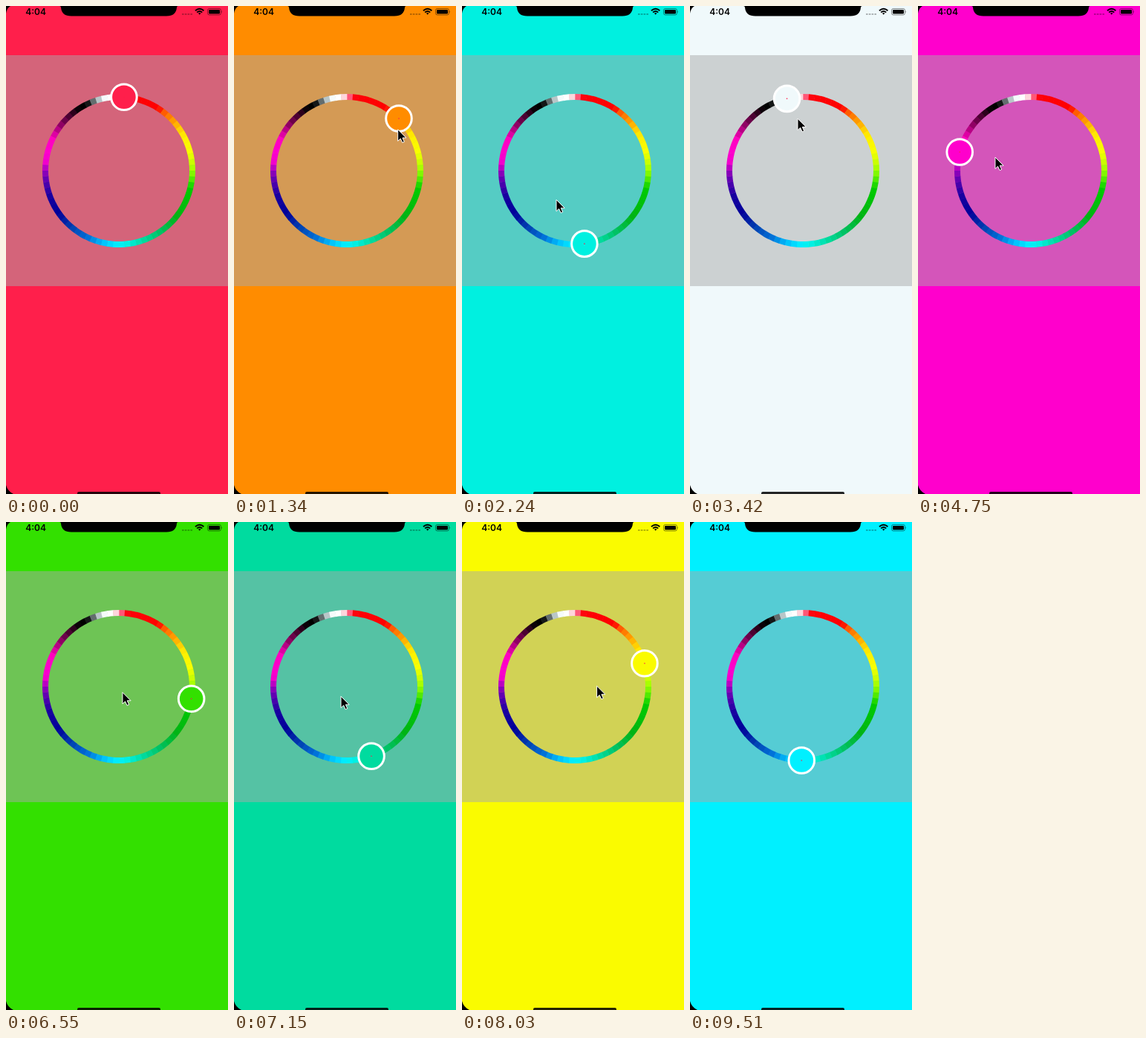
These frames come from a looping animation (299 px wide and 655 px high, 9940 ms). An HTML page:

```html
<!DOCTYPE html>
<html lang="en">
<head>
<meta charset="utf-8">
<title>Colour wheel</title>
<style>
  html, body { margin: 0; width: 100%; height: 100%; overflow: hidden; }
  svg { display: block; width: 299px; height: 655px; }
  text { font: 600 12px Inter, Roboto, sans-serif; }
</style>
</head>
<body>
<svg id="stage" viewBox="0 0 299 655">
  <rect id="back" width="299" height="655"/>
  <rect y="66" width="299" height="310" fill="#aaa" fill-opacity=".5"/>
  <g id="ring" fill="none" stroke-width="8"></g>
  <g id="knob">
    <circle id="disc" r="17.3" stroke="#fff" stroke-width="3"/>
    <circle r=".8" fill="#ff1f4b"/>
  </g>

  <!-- screen corners, notch and home bar -->
  <path d="M0 0H6Q1 3 0 10ZM0 643Q2 651 10 655H0Z"/>
  <path d="M72 0H232Q230 0 230 2Q229 13.5 216 13.5H88Q75 13.5 74 2Q74 0 72 0Z"/>
  <rect x="96" y="652" width="112" height="6" rx="2" fill-opacity=".85"/>

  <!-- status bar -->
  <text x="26.3" y="12.3">4:04</text>
  <path d="M237 11H251" stroke="#000" stroke-opacity=".28" stroke-width="2.2" stroke-dasharray="2.6 1.2"/>
  <g fill="none" stroke="#000" stroke-width="1.9">
    <path d="M255 6.2Q260.7 1.4 266.4 6.2M257.2 8.6Q260.7 5.6 264.2 8.6"/>
    <path d="M259 9.7Q260.7 8.5 262.4 9.7L260.7 11.8Z" fill="#000" stroke="none"/>
  </g>
  <rect x="271.5" y="3.5" width="18" height="8.5" rx="2.4" fill="none" stroke="#000" stroke-opacity=".45"/>
  <rect x="273" y="5" width="15" height="5.5" rx="1.2"/>
  <path d="M290.5 6.2Q292.2 7.7 290.5 9.3Z" fill-opacity=".5"/>

  <path id="cursor" d="M0 0V15.5L3.6 12.2L6.1 17.6L8.7 16.5L6.3 11.2H11.2Z" stroke="#fff"/>
</svg>
<script>
const el = id => document.getElementById(id);
const LOOP = 9940, STEP = 148.7;

// Wheel colours by degrees clockwise from the top
const stops = [
  [0, 'ffa0b0'], [4, 'ff1f4b'], [7, 'ff0008'], [32, 'ff0000'], [38, 'ff5a00'],
  [45, 'ff8c00'], [50, 'ffa800'], [55, 'ffc905'], [62, 'ffee00'], [75, 'f8ff00'],
  [83, 'ccff00'], [90, '99ff00'], [98, '44e600'], [104, '00cc00'], [128, '00b414'],
  [145, '00c060'], [160.5, '00db9f'], [172.5, '00f0e0'], [181, '00f0ff'], [190, '00ccff'],
  [197, '00a4f0'], [205, '0070d8'], [220, '0040b0'], [235, '000099'], [250, '1800a0'],
  [262, '5800b0'], [270, '9a00bd'], [276, 'f000cc'], [284.6, 'ff00cc'], [295, 'ff00c0'],
  [302, 'c80090'], [310, '800058'], [320, '380024'], [328, '000000'], [334, '000000'],
  [338, '404848'], [343, 'a4b2b4'], [347.5, 'f0f9fb'], [351, 'ffffff'], [356, 'ffffff'],
  [360, 'ffa0b0']
].map(([deg, hex]) => [deg, hex.match(/../g).map(h => parseInt(h, 16))]);

function wheelColor(angle) {
  const deg = (angle % 360 + 360) % 360;
  const i = stops.findIndex(s => s[0] > deg);
  const [a, from] = stops[i - 1], [b, to] = stops[i];
  const mix = from.map((v, c) => Math.round(v + (to[c] - v) * (deg - a) / (b - a)));
  return `rgb(${mix})`;
}

function polar(cx, cy, r, deg) {
  const a = deg * Math.PI / 180;
  return [cx + r * Math.sin(a), cy - r * Math.cos(a)];
}
const onRing = deg => polar(152, 221, 99, deg);

const SLICE = 4.5;
let arcs = '';
for (let d = 0; d < 360; d += SLICE)
  arcs += `<path d="M${onRing(d)}A99 99 0 0 1 ${onRing(d + SLICE + .2)}" stroke="${wheelColor(d + SLICE / 2)}"/>`;
el('ring').innerHTML = arcs;

// Drag: step, knob angle, pointer lead in degrees, pointer radius
const drag = [
  [5, 4, -7.9, 111.2], [15, 172.5, 37.5, 45], [23, 347.5, 8.8, 70], [32, 644.6, 7, 49],
  [39, 775, 19.6, 15], [48, 880.5, 42.5, 14], [58, 1261, 4, 40]
];

function slope(i, col) {
  const a = drag[i - 1], b = drag[i + 1];
  return a && b ? (b[col] - a[col]) / (b[0] - a[0]) : 0;
}

// Smooth curve through the drag keys
function dragAt(step, col) {
  const n = Math.min(58, Math.max(5, step));
  const i = Math.max(1, drag.findIndex(k => k[0] >= n));
  const a = drag[i - 1], b = drag[i], span = b[0] - a[0];
  const u = (n - a[0]) / span, v = 1 - u;
  return v * v * ((1 + 2 * u) * a[col] + u * span * slope(i - 1, col))
       + u * u * ((1 + 2 * v) * b[col] - v * span * slope(i, col));
}

function pointerAt(n, angle) {
  if (n < 2 || n > 63) return null;
  if (n < 4) return [248 - 53 * (n - 2), 57 + 27 * (n - 2)];
  if (n < 60) return polar(149.5, 221, dragAt(n, 3), angle + dragAt(n, 2));
  return n === 60 ? [200, 430] : n < 63 ? [256, 606] : [266, 629];
}

const moveTo = (id, p) => el(id).setAttribute('transform', `translate(${p})`);

function draw(now) {
  const n = Math.floor((now % LOOP + 12) / STEP);
  const angle = dragAt(n, 1), color = wheelColor(angle), pointer = pointerAt(n, angle);
  el('back').setAttribute('fill', color);
  el('disc').setAttribute('fill', color);
  moveTo('knob', onRing(angle));
  el('cursor').style.display = pointer ? '' : 'none';
  if (pointer) moveTo('cursor', pointer);
}

const start = performance.now();
function tick() {
  draw(performance.now() - start);
  requestAnimationFrame(tick);
}
tick();
</script>
</body>
</html>
```
